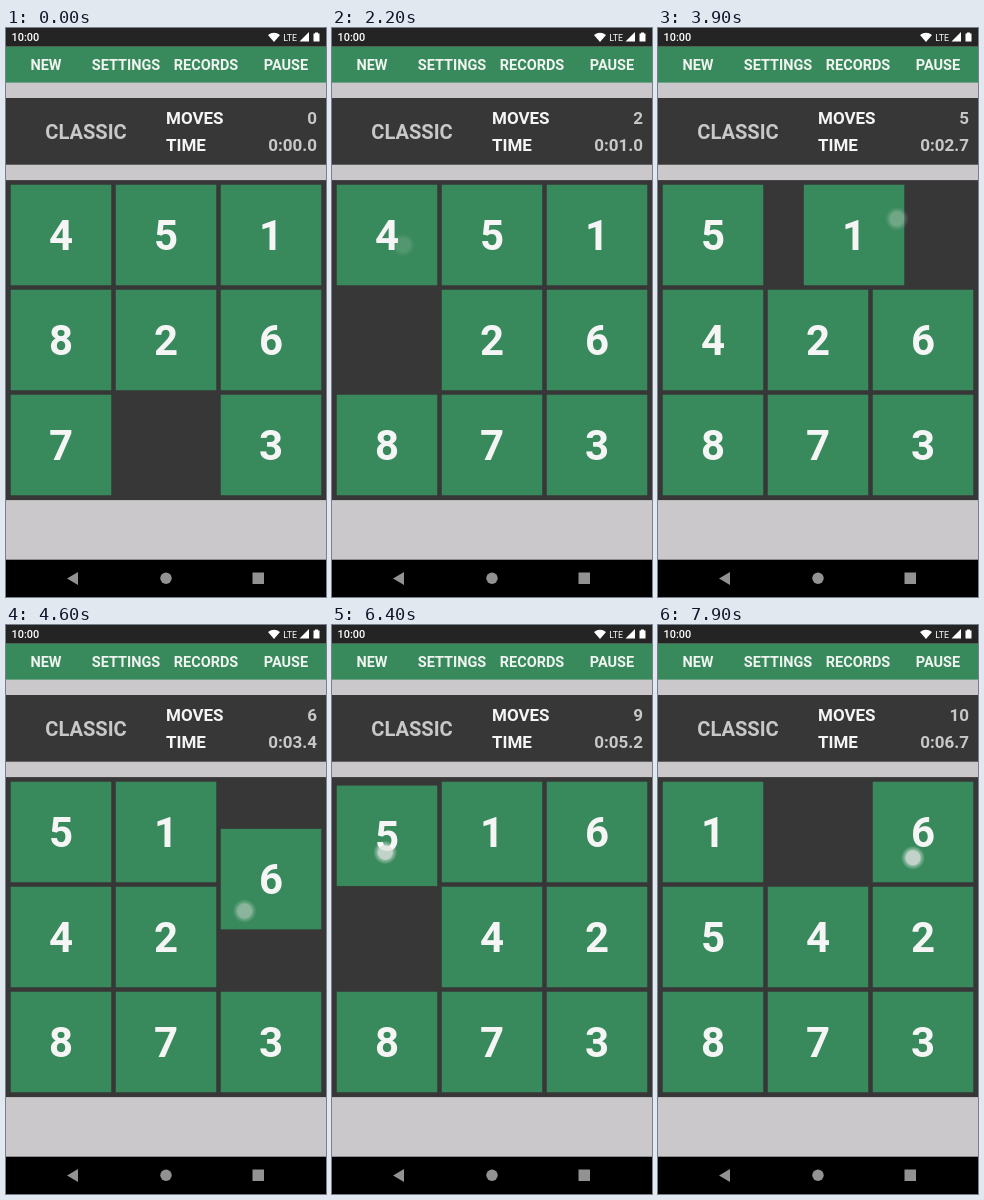
Animation, 320 px wide and 569 px high, one loop 8000 ms. Source, as an HTML page:

```html
<!DOCTYPE html>
<html lang="en">
<head>
<meta charset="utf-8">
<title>Sliding puzzle</title>
<style>
  html, body { margin: 0; height: 100%; overflow: hidden; background: #cac8ca; }
  svg { display: block; width: 100vw; height: 100vh; font-family: Roboto, sans-serif; font-weight: 700; }
  .menu { font-size: 14.5px; fill: #f0f4f1; text-anchor: middle; }
  .label { font-size: 17px; fill: #f5f5f5; }
  .value { font-size: 17px; fill: #c8c8c8; text-anchor: end; }
  .tile { font-size: 42px; fill: #f4f5f4; text-anchor: middle; }
</style>
</head>
<body>
<svg viewBox="0 0 320 569">
  <defs>
    <radialGradient id="glow">
      <stop offset="0.6" stop-color="#fff" stop-opacity="0.5"/>
      <stop offset="1" stop-color="#fff" stop-opacity="0"/>
    </radialGradient>
  </defs>
  <rect width="320" height="569" fill="#cac8ca"/>
  <rect width="320" height="18.7" fill="#242424"/>
  <g fill="#fff" font-weight="500">
    <text x="5.5" y="13" font-size="10.9">10:00</text>
    <path d="M262 7Q268 2.5 274 7L268 14Z"/>
    <text x="277.3" y="13" font-size="8.8" font-weight="400">LTE</text>
    <path d="M303 4V13.5H293.5Z"/>
    <path d="M307.5 5.5H309V4.5H312V5.5H313.5V13.5H307.5Z"/>
  </g>

  <rect y="18.7" width="320" height="35.9" fill="#38895b"/>
  <g id="menu"></g>

  <rect y="70" width="320" height="66.7" fill="#373737"/>
  <text x="80" y="111" font-size="20.1" fill="#c8c8c8" text-anchor="middle">CLASSIC</text>
  <text class="label" x="160" y="96">MOVES</text>
  <text class="label" x="160" y="123">TIME</text>
  <text class="value" id="count" x="311" y="96">0</text>
  <text class="value" id="clock" x="311" y="123">0:00.0</text>

  <rect y="152.1" width="320" height="320" fill="#373737"/>
  <g id="board"></g>
  <g id="touch" opacity="0">
    <circle r="12" fill="url(#glow)"/>
    <circle r="7.5" fill="#d8dcd9" fill-opacity="0.62"/>
  </g>

  <rect y="531.7" width="320" height="38"/>
  <g fill="#929292">
    <path d="M61 550.5L72 544V557Z"/>
    <circle cx="160" cy="550.3" r="5.7"/>
    <rect x="246.5" y="544.5" width="11.5" height="11.5"/>
  </g>
</svg>
<script>
const LOOP = 8000, SLIDE = 300;
const STEP = 105, SIZE = 100.5, LEFT = 160, TOP = 312;
const START = '4518267.3', ORDER = '78451624516', LAST_SWIPE = 7990;

const byId = id => document.getElementById(id);
const clamp = v => Math.min(1, Math.max(0, v));
const ease = v => (1 - Math.cos(Math.PI * clamp(v))) / 2;
const place = (node, x, y) => node.setAttribute('transform', `translate(${x} ${y})`);
const [menu, board, touch, count, clock] = ['menu', 'board', 'touch', 'count', 'clock'].map(byId);

// Column and row relative to the middle cell.
const spot = cell => ({ col: cell % 3 - 1, row: Math.floor(cell / 3) - 1 });

// The player's rhythm speeds up and slows down, then pauses before the last swipe.
const startOf = i => i === ORDER.length - 1 ? LAST_SWIPE : 1131 + 650.6 * i - 98.3 * Math.sin(0.75 * i);

// Each tile slides into the gap, which then takes the tile's cell.
const cells = [...START];
const moves = [...ORDER].map((digit, i) => {
  const cell = cells.indexOf(digit), gap = cells.indexOf('.');
  const from = spot(cell), to = spot(gap);
  [cells[cell], cells[gap]] = ['.', digit];
  return { digit, ...from, dx: to.col - from.col, dy: to.row - from.row,
           start: startOf(i), side: -28 * Math.sin(0.616 * (i - 3)) };
});

menu.innerHTML = ['NEW', 'SETTINGS', 'RECORDS', 'PAUSE'].map((word, i) =>
  `<text class="menu" x="${40 + 80 * i}" y="42">${word}</text>`).join('');

const tiles = [...START].filter(d => d !== '.').map(digit => {
  board.insertAdjacentHTML('beforeend', `<g>
    <rect x="${-SIZE / 2}" y="${-SIZE / 2}" width="${SIZE}" height="${SIZE}" fill="#38895b"/>
    <text class="tile" y="15">${digit}</text></g>`);
  return { node: board.lastElementChild, home: spot(START.indexOf(digit)),
           moves: moves.filter(m => m.digit === digit) };
});

function drawTile({ node, home, moves }, t) {
  let { col, row } = home;
  for (const { start, dx, dy } of moves) {
    const p = ease((t - start) / SLIDE);
    col += dx * p;
    row += dy * p;
  }
  place(node, LEFT + col * STEP, TOP + row * STEP);
}

function drawTouch(t) {
  const m = moves.find(({ start }) => t > start - 140 && t < start + 220);
  if (!m) return touch.setAttribute('opacity', 0);
  const age = t - m.start;
  const along = 10 + 16 * ease((age + 70) / 180);
  touch.setAttribute('opacity', clamp((age + 140) / 30) * clamp((220 - age) / 100));
  place(touch,
    LEFT + m.col * STEP + m.dx * along + Math.abs(m.dy) * m.side,
    TOP + m.row * STEP + m.dy * along + Math.abs(m.dx) * m.side);
}

function draw(now) {
  const t = now % LOOP;
  tiles.forEach(tile => drawTile(tile, t));
  drawTouch(t);
  count.textContent = moves.filter(({ start }) => t >= start).length;
  const tenths = Math.floor(Math.max(0, t - moves[0].start) / 100);
  clock.textContent = '0:' + (tenths / 10).toFixed(1).padStart(4, '0');
}

let origin;
function tick(now) {
  origin ??= now;
  draw(now - origin);
  requestAnimationFrame(tick);
}
draw(0);
requestAnimationFrame(tick);
</script>
</body>
</html>
```
